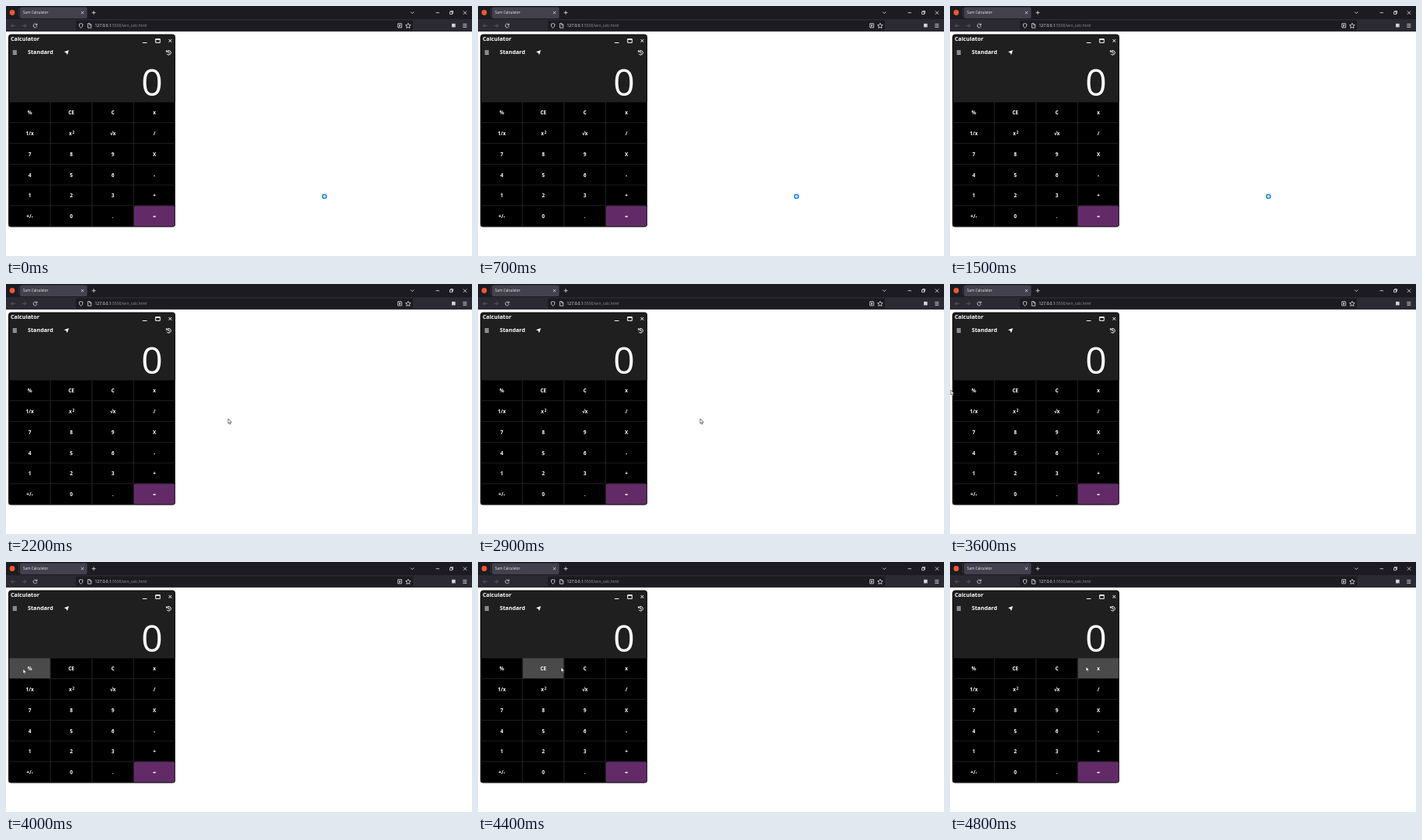
Write an HTML page that moves like this. It is 600 by 323 pixels and loops after 5000 ms.

```html
<!DOCTYPE html>
<html lang="en">
<head>
<meta charset="utf-8">
<title>Calculator</title>
<style>
html, body { margin: 0; width: 100%; height: 100%; overflow: hidden; background: #fff; }
svg { display: block; width: 600px; height: 323px; }
text { font-family: "Open Sans", "Noto Sans", sans-serif; fill: #fff; }
.ui { font-size: 4.6px; fill: #f4f3f8; }
.url { font-size: 5px; fill: #93929a; }
.bold { font-size: 7.2px; font-weight: 700; }
.key { font-size: 6.5px; font-weight: 700; text-anchor: middle; }
.line { fill: none; stroke: #e6e5ec; stroke-width: .8; }
.dim { stroke: #62616b; }
.white { fill: none; stroke: #fff; stroke-width: 1; }
</style>
</head>
<body>
<svg viewBox="0 0 600 323">
  <!-- browser frame -->
  <rect width="600" height="33" fill="#2b2a33"/>
  <rect width="600" height="17" fill="#1c1b22"/>
  <circle cx="8" cy="8.5" r="3.4" fill="#f0562f"/>
  <path d="M16.5 3v11" stroke="#42414d" stroke-width=".6"/>
  <rect x="18" y="1.5" width="86.5" height="14.5" rx="2" fill="#42414d"/>
  <text class="ui" x="22" y="10.3">Sum Calculator</text>
  <path class="line" d="M96.8 7l3.2 3.2m0-3.2l-3.2 3.2M110.5 8.6h5m-2.5-2.5v5M521 7.5l2.2 2.2l2.2-2.2M553.5 8.7h4.4M588.8 6.5l4.4 4.4m0-4.4l-4.4 4.4"/>
  <path class="line" stroke-width=".6" d="M571.5 7.6h3v3h-3zM572.5 7.5v-1h3v3h-1"/>
  <path class="line dim" d="M12 25.4H6.5m2.5-2.5l-2.5 2.5l2.5 2.5M20.500 25.4H26m-2.500-2.500l2.500 2.500l-2.500 2.500"/>
  <path class="line" d="M39.4 23.900a2.400 2.400 0 1 0 .5 2M40 22.500v2h-2"/>
  <rect x="90" y="18.500" width="434" height="13" rx="2" fill="#1c1b22"/>
  <path class="line" d="M96.500 22.600l2.400.8q.2 3.500-2.400 5q-2.600-1.500-2.400-5zM105.400 22.600h2.800l1.500 1.500v4.100h-4.300zM107.800 22.800v1.700h1.700"/>
  <text class="url" x="114.500" y="27.300"><tspan fill="#f4f3f8">127.0.0.1</tspan>:5500/win_calc.html</text>
  <path class="line" d="M504.600 22.700h4.800v5.200h-4.800zM506 24.300h2m-2 1.200h2m-2 1.200h1.300"/>
  <path class="line" d="M517.800 22.200l1 2.100l2.300.3l-1.700 1.600l.5 2.300l-2.100-1.100l-2.100 1.100l.5-2.300l-1.700-1.600l2.300-.3z"/>
  <rect x="574" y="22.800" width="4.600" height="4.600" fill="#d4d3da"/>
  <path class="line" d="M588.300 23.400h5m-5 2h5m-5 2h5"/>

  <!-- calculator -->
  <rect x="3" y="36.500" width="215" height="249" rx="4" fill="#000"/>
  <path d="M4 124V41q0-3.500 3.500-3.500h206q3.500 0 3.500 3.500v83z" fill="#1f1f1f"/>
  <text class="bold" x="6" y="45">Calculator</text>
  <text class="bold" x="28" y="62.400">Standard</text>
  <path class="white" d="M175.800 47.500h5.600M192.700 42.600h5.600v4.800h-5.600zM192.700 43.300h5.600M209.500 43l3.800 3.800m0-3.800l-3.800 3.800M8.700 58h5.200m-5.200 2.100h5.200m-5.200 2.100h5.200"/>
  <path d="M81 57l-2.200 6.200l-1.200-2.700l-2.800-1.200z" fill="#fff"/>
  <path class="white" d="M207.200 58.700a2.800 2.800 0 1 1-.1 3M206.600 57.200v2h2M209.600 58.700v1.700l1.300.8" stroke-width=".9"/>
  <text x="188" y="116" font-size="48" text-anchor="middle">0</text>
  <g id="keys"></g>

  <circle id="ring" r="2.500" fill="#fff" stroke="#1687e0" stroke-width="1.600"/>
  <path id="arrow" d="M0 0v6.200l1.400-1.200l1 2.200l1-.5l-1-2h2z" fill="#fff" stroke="#222" stroke-width=".6"/>
</svg>
<script>
const $ = id => document.getElementById(id);
const labels = "% CE C x 1/x x² √x / 7 8 9 X 4 5 6 - 1 2 3 + +/- 0 . =".split(" ");
const keyW = 53.5, keyH = 26.8, left = 4, top0 = 124;

function add(tag, attrs, text = "") {
  const el = document.createElementNS("http://www.w3.org/2000/svg", tag);
  for (const name in attrs) el.setAttribute(name, attrs[name]);
  el.textContent = text;
  return $("keys").appendChild(el);
}

const keys = labels.map((label, i) => {
  const x = left + i % 4 * keyW, y = top0 + Math.floor(i / 4) * keyH;
  const rect = add("rect", {
    x, y, width: keyW - .5, height: keyH, rx: i > 22 ? 2 : 0,
    stroke: "#242424", "stroke-width": .7
  });
  const text = add("text", { class: "key", x: x + 26.6, y: y + 16.1 }, label === "x²" ? "x" : label);
  if (label === "x²") {
    text.setAttribute("x", x + 25.4);
    add("text", { class: "key", x: x + 29.3, y: y + 13.7, style: "font-size:4.6px" }, "2");
  }
  return rect;
});

// Pointer path: time, x, y
const path = [
  [0, 410, 246], [1500, 410, 246], [1800, 304, 190], [2100, 286, 174],
  [3100, 286, 174], [3300, 92, 184], [3400, 55, 180], [3500, 1, 137],
  [3700, 1, 137], [4000, 22, 138], [4200, 48, 138], [4400, 107, 136],
  [4600, 170, 135], [4800, 175, 135], [5000, 175, 135]
];

function pointer(t) {
  const i = path.findIndex(p => p[0] > t);
  const [t0, x0, y0] = path[i - 1], [t1, x1, y1] = path[i];
  const k = (t - t0) / (t1 - t0);
  return [x0 + (x1 - x0) * k, y0 + (y1 - y0) * k];
}

function keyAt([x, y]) {
  const col = Math.floor((x - left) / keyW), row = Math.floor((y - top0) / keyH);
  return col >= 0 && col < 4 && row >= 0 && row < 6 ? row * 4 + col : -1;
}

function draw(now) {
  const t = Math.floor(now % 5000 / 100) * 100;
  const [x, y] = pointer(t), busy = t < 1700;
  // The highlight trails the pointer slightly
  const hot = keyAt(pointer(Math.max(0, t - 50)));
  keys.forEach((key, i) => key.setAttribute("fill", i === hot ? "#4a4a4a" : i === 23 ? "#622a67" : "#000"));
  for (const [id, shown] of [["ring", busy], ["arrow", !busy]]) {
    $(id).setAttribute("transform", `translate(${x} ${y})`);
    $(id).setAttribute("visibility", shown ? "visible" : "hidden");
  }
}

function tick() {
  draw(performance.now());
  requestAnimationFrame(tick);
}
tick();
</script>
</body>
</html>
```
